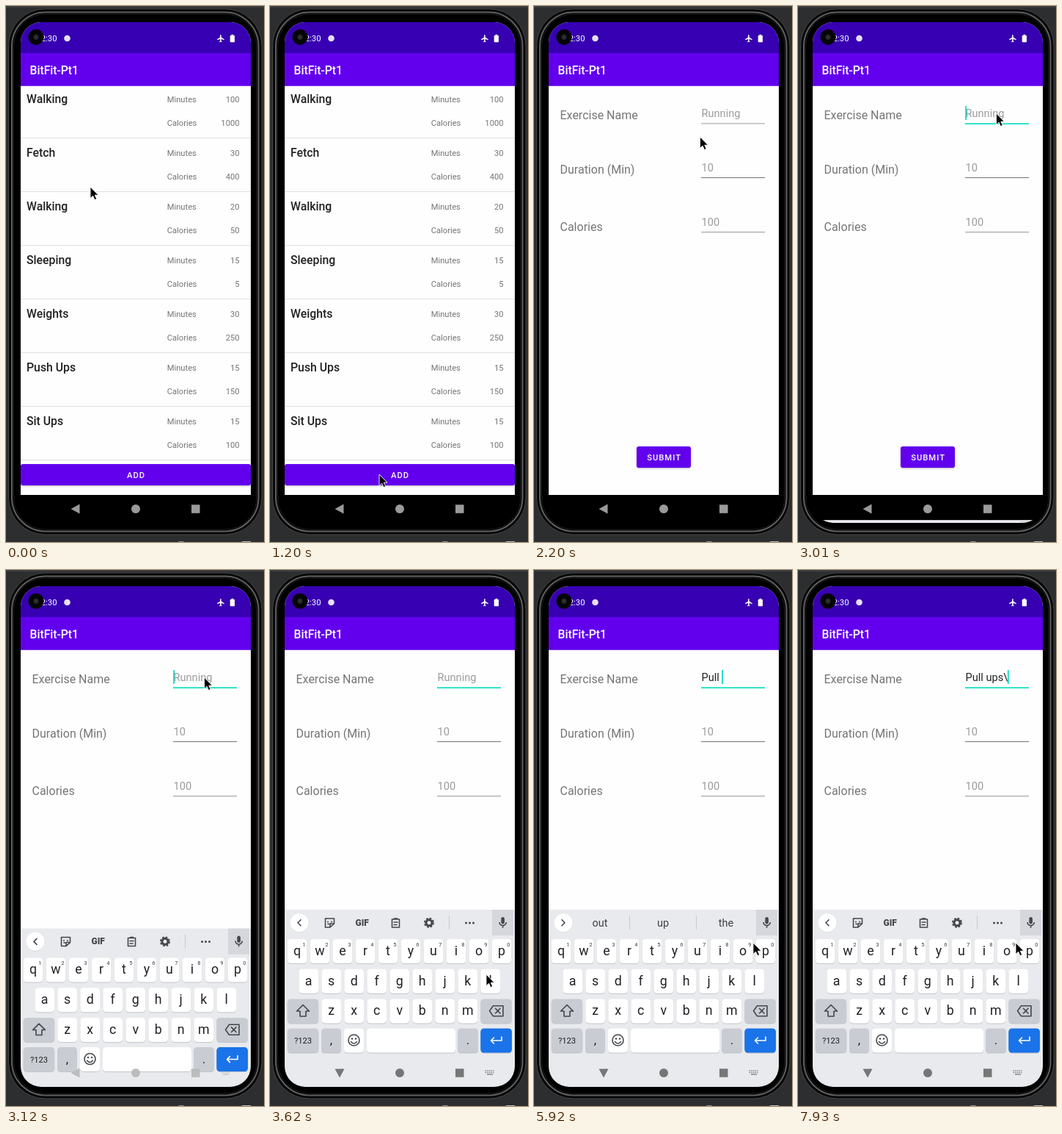
An HTML page that plays this animation: 352 px wide and 729 px high, repeating every 8000 ms.

```html
<!DOCTYPE html>
<html lang="en">
<head>
<meta charset="utf-8">
<style>
html, body { margin: 0; width: 100%; height: 100%; overflow: hidden; background: #2d2e30; }
svg { display: block; width: 352px; height: 729px; font-family: Roboto, sans-serif; }
text { white-space: pre; }
.mid { text-anchor: middle; }
.end { text-anchor: end; }
.bold { font-weight: 500; }
.caps { letter-spacing: 1px; }
.line { fill: none; stroke: #44474b; stroke-width: 1.6; stroke-linecap: round; stroke-linejoin: round; }
</style>
</head>
<body>
<svg id="stage" viewBox="0 0 352 729"></svg>
<script>
const LOOP = 8000;
const PURPLE = '#6200ee', TEAL = '#03dac5', GREY = '#757575', INK = '#44474b';

// Markup helpers
const rect = (x, y, w, h, fill, rx = 0, extra = '') =>
  `<rect x="${x}" y="${y}" width="${w}" height="${h}" rx="${rx}" fill="${fill}" ${extra}/>`;
const text = (s, x, y, size, fill, cls = '', extra = '') =>
  `<text x="${x}" y="${y}" font-size="${size}" fill="${fill}" class="${cls}" ${extra}>${s}</text>`;
const circle = (x, y, r, fill, extra = '') =>
  `<circle cx="${x}" cy="${y}" r="${r}" fill="${fill}" ${extra}/>`;
const path = (d, extra = 'class="line"') => `<path d="${d}" ${extra}/>`;
const group = (id, body, extra = '') => `<g id="${id}" ${extra}>${body}</g>`;

const page = (id, body) => group(id,
  rect(20, 22, 314, 681, '#000') + rect(20, 22, 314, 643, '#fefefe') +
  rect(20, 22, 314, 42, '#3700b3') + rect(20, 64, 314, 44.8, PURPLE) +
  text('BitFit-Pt1', 32.5, 93, 15.7, '#fff', 'bold') + body);

const button = (label, x, y, w, id = '') =>
  `<g id="${id}" filter="url(#${id ? 'lift' : 'rest'})">${rect(x, y, w, 29, PURPLE, 3)}</g>` +
  text(label, 177.6, y + 18.7, 11.2, '#fff', 'mid bold caps');

function listBody() {
  const items = [['Walking', 100, 1000], ['Fetch', 30, 400], ['Walking', 20, 50], ['Sleeping', 15, 5],
    ['Weights', 30, 250], ['Push Ups', 15, 150], ['Sit Ups', 15, 100]];
  const rows = items.map(([name, minutes, calories], i) => {
    const y = i * 73;
    return text(name, 28, y + 132.3, 15.8, '#212121', 'bold') +
      text('Minutes', 219.7, y + 131, 11.2, GREY) + text(minutes, 318.5, y + 131, 11.2, GREY, 'end') +
      text('Calories', 219.7, y + 162.5, 11.2, GREY) + text(calories, 318.5, y + 162.5, 11.2, GREY, 'end') +
      rect(20, y + 179, 314, 1, '#e0e0e0');
  }).join('');
  return rows + button('ADD', 20, 623, 314, 'add') +
    `<g clip-path="url(#addClip)">${circle(148, 637, 0, '#fff', 'id="ripple"')}</g>`;
}

function formBody() {
  const label = (s, y) => text(s, 35.5, y, 16, GREY);
  return label('Exercise Name', 154.3) + label('Duration (Min)', 228) + label('Calories', 305.5) +
    text('Running', 228.5, 151, 14.6, '#9c9c9c', '', 'id="hint"') +
    text('10', 228.5, 225, 14.6, '#9c9c9c') + text('100', 228.5, 298.5, 14.6, '#9c9c9c') +
    rect(228, 159.4, 87, 1, '#9a9a9a', 0, 'id="underline"') +
    rect(228, 233, 87, 1, '#707070') + rect(228, 307, 87, 1, '#9a9a9a') +
    text('', 228.5, 151, 14.6, '#212121', '', 'id="typed"') +
    rect(229, 153, 0, 1, '#212121', 0, 'id="compose"') +
    rect(228.2, 136, 1.7, 19, TEAL, 0, 'id="caret"') +
    button('SUBMIT', 140, 599, 74);
}

function keyboard() {
  const key = (x, y, w, fill = '#fff') =>
    rect(x, y + 1, w, 33, '#c3c6ca', 4.5) + rect(x, y, w, 33, fill, 4.5);
  const soft = '#c9ccd2';
  let caps = '', letters = '', digits = '';
  [['qwertyuiop', 37], ['asdfghjkl', 52.7], ['zxcvbnm', 83.7]].forEach(([row, x0], r) => {
    [...row].forEach((c, i) => {
      const x = x0 + i * 31, y = 502 + r * 40.7;
      caps += key(x - 13.3, y, 26.6);
      letters += text(c, x, y + 21.8, 17.8, '#202124', 'mid');
      if (!r) digits += text((i + 1) % 10, x + 9.5, y + 9.5, 7.5, '#5f6368', 'mid bold');
    });
  });
  const special = key(23.7, 583.4, 42.5, soft) + key(287.3, 583.4, 42.7, soft) +
    key(23.7, 623.5, 42.5, soft) + key(70, 623.5, 27, soft) + key(101, 623.5, 27) +
    key(132, 623.5, 121) + key(256, 623.5, 28, soft) + key(287.3, 623.5, 42.7, '#1a73e8') +
    text('?123', 45, 644, 11.2, '#202124', 'mid') + text(',', 83.5, 645, 17, '#202124', 'mid') +
    text('.', 270, 645, 17, '#202124', 'mid') +
    path('M45 591.5L53.5 600H49V607H41V600H36.5Z', 'class="line" id="shift"') +
    path('M299.5 599.7L304.5 592.7H318V606.7H304.5ZM307.5 596.3L314 603M314 596.3L307.5 603') +
    circle(114.5, 639.5, 7.5, 'none', 'class="line"') + circle(112, 637.5, 1.2, INK) +
    circle(117, 637.5, 1.2, INK) + path('M110.5 641.5Q114.5 646.5 118.5 641.5') +
    path('M316 635V640H301.5M305.5 636L301.5 640L305.5 644', 'class="line" style="stroke:#fff"');
  const mic = 'M12 14c1.7 0 3-1.3 3-3V5c0-1.7-1.3-3-3-3S9 3.3 9 5v6c0 1.7 1.3 3 3 3zm5-3c0 2.8-2.2 5-5 5s-5-2.2-5-5H5c0 3.5 2.6 6.4 6 6.9V21h2v-3.1c3.4-.5 6-3.4 6-6.9h-2z';
  const tools = path('M75.5 474H87.5V481L82 486H75.5ZM87.5 481H82V486M79 478V479M84 478V479M79 481.5H81') +
    text('GIF', 125.7, 483.9, 12, INK, 'mid', 'font-weight="900"') +
    path('M166.5 475H176.5V486H166.5ZM169.5 474H173.5M169 479H174M169 482.5H173') +
    circle(217, 479.8, 4, 'none', `stroke="${INK}" stroke-width="3"`) +
    circle(217, 479.8, 6, 'none', `stroke="${INK}" stroke-width="2" stroke-dasharray="2.7 2"`) +
    rect(244, 470, 1, 19, '#c8cacd') + [267.5, 272.5, 277.5].map(x => circle(x, 480, 1.5, INK)).join('');
  const words = [90, 176, 262].map((x, i) => text('', x, 485, 14.4, '#3c4043', 'mid', `id="word${i}"`)).join('');
  return rect(20, 462, 314, 260, '#e8eaed') + rect(303, 462, 29, 35, '#d5d7dc') +
    path(mic, `fill="${INK}" transform="translate(308.4 470.5) scale(.77)"`) +
    circle(40, 480.5, 12.5, '#d0d2d5') + circle(40, 479.8, 12.5, '#fff') +
    path('M2 -4L-2 0L2 4', 'class="line" id="chevron"') +
    group('tools', tools) +
    group('words', words + rect(130, 470, 1, 19, '#c8cacd') + rect(221, 470, 1, 19, '#c8cacd')) +
    caps + special + group('letters', letters) + digits;
}

const nav = path('M-6.5 0L5.5 -6.5V6.5Z', 'id="back"') + '<circle cx="177" cy="684" r="6"/>' +
  '<rect x="253" y="678.3" width="11.5" height="11.5"/>' +
  group('imeIcon', [681, 683.5, 686].map((y, i) =>
    path(`M${i > 1 ? 296 : 293.5} ${y}H${i > 1 ? 304 : 306}`,
      `stroke="#888" stroke-width="1.5" stroke-dasharray="${i > 1 ? 8 : '1.6 1'}"`)).join(''));

const plane = 'M21 16v-2l-8-5V3.5C13 1.5 10 1.5 10 3.5V9l-8 5v2l8-2.5V19l-2 1.5V22l3.5-1 3.5 1v-1.5L13 19v-5.5l8 2.5z';
const statusBar = text('2:30', 69.5, 48.3, 11.3, '#fff', 'end') +
  circle(83.5, 44, 4.3, '#e6e0f5') +
  path(plane, 'fill="#fff" transform="translate(287 38) scale(.51)"') +
  rect(305.7, 40, 6.3, 9.3, '#fff', 1) + rect(307.5, 38.8, 2.7, 2, '#fff') +
  circle(41, 42.3, 10.6, '#050505') + circle(41, 42.3, 3, '#151515', 'stroke="#3c3c3c"') + circle(41, 42.3, 1, '#666');

const stage = document.getElementById('stage');
const shadowFilter = (id, shadow) =>
  `<filter id="${id}" x="-10%" y="-30%" width="120%" height="190%">
    <feDropShadow id="${shadow}" dx="0" dy="1" stdDeviation=".9" flood-opacity=".28"/></filter>`;
stage.innerHTML = `<defs>
  <clipPath id="screen">${rect(20, 22, 314, 681, '#000', 28)}</clipPath>
  <clipPath id="addClip">${rect(20, 623, 314, 29, '#000', 3)}</clipPath>
  ${shadowFilter('lift', 'shadow')}${shadowFilter('rest', 'restShadow')}</defs>` +
  rect(0, 0, 352, 729, '#2d2e30') + rect(0, 0, 352, 2, '#3d3e40') +
  rect(3.5, 4, 345.5, 715, '#080808', 50, 'stroke="#454545"') +
  rect(8, 8.5, 336.5, 706, '#000', 46, 'stroke="#606060" stroke-width="2"') +
  rect(10.5, 11, 331.5, 701, '#000', 43, 'stroke="#202020"') +
  '<ellipse cx="239" cy="730" rx="5" ry="2" fill="#aaa"/>' + rect(322, 728, 12, 1, '#bbb') +
  `<g clip-path="url(#screen)">${rect(20, 22, 314, 681, '#000')}${page('list', listBody())}${page('form', formBody())}` +
  statusBar + group('keys', keyboard()) + group('nav', nav) + '</g>' +
  path('M0 0V15.5L3.6 12.2L6 17.6L8.7 16.4L6.3 11.2H11Z', 'id="pointer" stroke="#fff" stroke-width=".9"');

const el = id => document.getElementById(id);
const show = (id, on) => el(id).style.display = on ? '' : 'none';
const set = (id, attrs) => { for (const k in attrs) el(id).setAttribute(k, attrs[k]); };
const clamp = v => Math.max(0, Math.min(1, v));
const span = (t, a, b) => clamp((t - a) / (b - a));
const latest = (list, t) => list.filter(s => s[0] <= t).pop();

// time, x, y of the pointer tip
const route = [[0, 115, 246], [30, 115, 246], [140, 114, 237], [830, 147, 637], [860, 147, 636],
  [1000, 149, 637], [1540, 149, 637], [2200, 226.5, 178], [2310, 291, 122], [2430, 291, 122],
  [2590, 270.5, 146], [3290, 270.5, 146], [3620, 295, 550], [3790, 292, 558], [3850, 292, 558],
  [3950, 288, 530], [4060, 299, 507], [7230, 299, 507], [7250, 297, 507], [LOOP, 297, 507]];

// time, field text, start of the word being composed
const typing = [[0, '', 0], [4760, 'P', 0], [5030, 'Pu', 0], [5230, 'Pul', 0], [5410, 'Pull', 0],
  [5710, 'Pull ', 0], [5920, 'Pull ', 5], [6390, 'Pull u', 5], [6660, 'Pull up', 5],
  [6840, 'Pull ups', 5], [7520, 'Pull ups\\', 5], [7810, 'Pull ups\\', 9]];

const hints = [[0], [4820, 'Please', 'P', 'Put'], [5230, 'Put', 'Pull', 'Push'], [5410, 'Pulled', 'Pull', 'Pulling'],
  [5620, 'Pulled', 'Pull', 'Pull up'], [5920, 'out', 'up', 'the'], [6600, 'you', 'up', 'us'],
  [6810, 'upon', 'up', 'update'], [7050, 'up', 'ups', 'upset'], [7810]];

function pointerAt(t) {
  const i = route.findIndex(p => p[0] > t);
  const [t0, x0, y0] = route[i - 1], [t1, x1, y1] = route[i];
  const p = span(t, t0, t1), e = p * p * (3 - 2 * p);
  return [x0 + (x1 - x0) * e, y0 + (y1 - y0) * e];
}

const zoom = s => `translate(177 362.5) scale(${s}) translate(-177 -362.5)`;

function draw(t) {
  set('pointer', { transform: `translate(${pointerAt(t)})` });

  // Button press and page change
  const press = span(t, 1220, 1400);
  set('ripple', { r: 200 * press, opacity: .24 * span(t, 1220, 1290) * (1 - span(t, 1400, 1600)) });
  set('shadow', { dy: 1 + 2 * press, stdDeviation: .9 + press });
  const open = 1 - (1 - span(t, 1560, 1960)) ** 4;
  show('list', open < 1);
  show('form', open > 0);
  set('list', { transform: zoom(1 + .05 * open) });
  set('form', { transform: zoom(.85 + .15 * open), opacity: span(t, 1560, 1640) });

  // Text field
  const focus = t >= 2770;
  set('underline', { fill: focus ? TEAL : '#9a9a9a', height: focus ? 1.6 : 1 });
  const [, value, start] = latest(typing, t), typed = el('typed');
  if (typed.textContent !== value) typed.textContent = value;
  show('hint', !value);
  const widthTo = n => n ? typed.getSubStringLength(0, n) : 0;
  const to = widthTo(value.length), from = value ? widthTo(start) : 0;
  set('compose', { x: 228.5 + from, width: to - from });
  set('caret', { x: 228.2 + to });
  show('caret', value || focus && (t < 3270 || t >= 3770 && t < 4290));

  // Keyboard
  show('keys', t >= 3010);
  set('keys', { transform: `translate(0 ${241 * (1 - span(t, 3010, 3300)) ** 4.65})` });
  const words = latest(hints, t).slice(1), hinting = words.length > 0;
  show('tools', !hinting);
  show('words', hinting);
  set('chevron', { transform: `translate(40 479.8) scale(${hinting ? -1 : 1} 1)` });
  words.forEach((w, i) => el('word' + i).textContent = w);
  const upper = t >= 4700 && t < 4800;
  el('letters').style.textTransform = upper ? 'uppercase' : 'none';
  el('shift').style.fill = upper ? INK : 'none';

  // Navigation icons
  const shade = Math.round(154 + 34 * span(t, 3010, 3110) - 70 * span(t, 3120, 3350));
  set('nav', { fill: `rgb(${shade},${shade},${shade})` });
  set('back', { transform: `translate(95 684) rotate(${-90 * span(t, 3150, 3350)})` });
  set('imeIcon', { opacity: .35 * span(t, 3010, 3110) + .65 * span(t, 3120, 3350) });
}

function frame() {
  draw(performance.now() % LOOP);
  requestAnimationFrame(frame);
}
frame();
</script>
</body>
</html>
```
